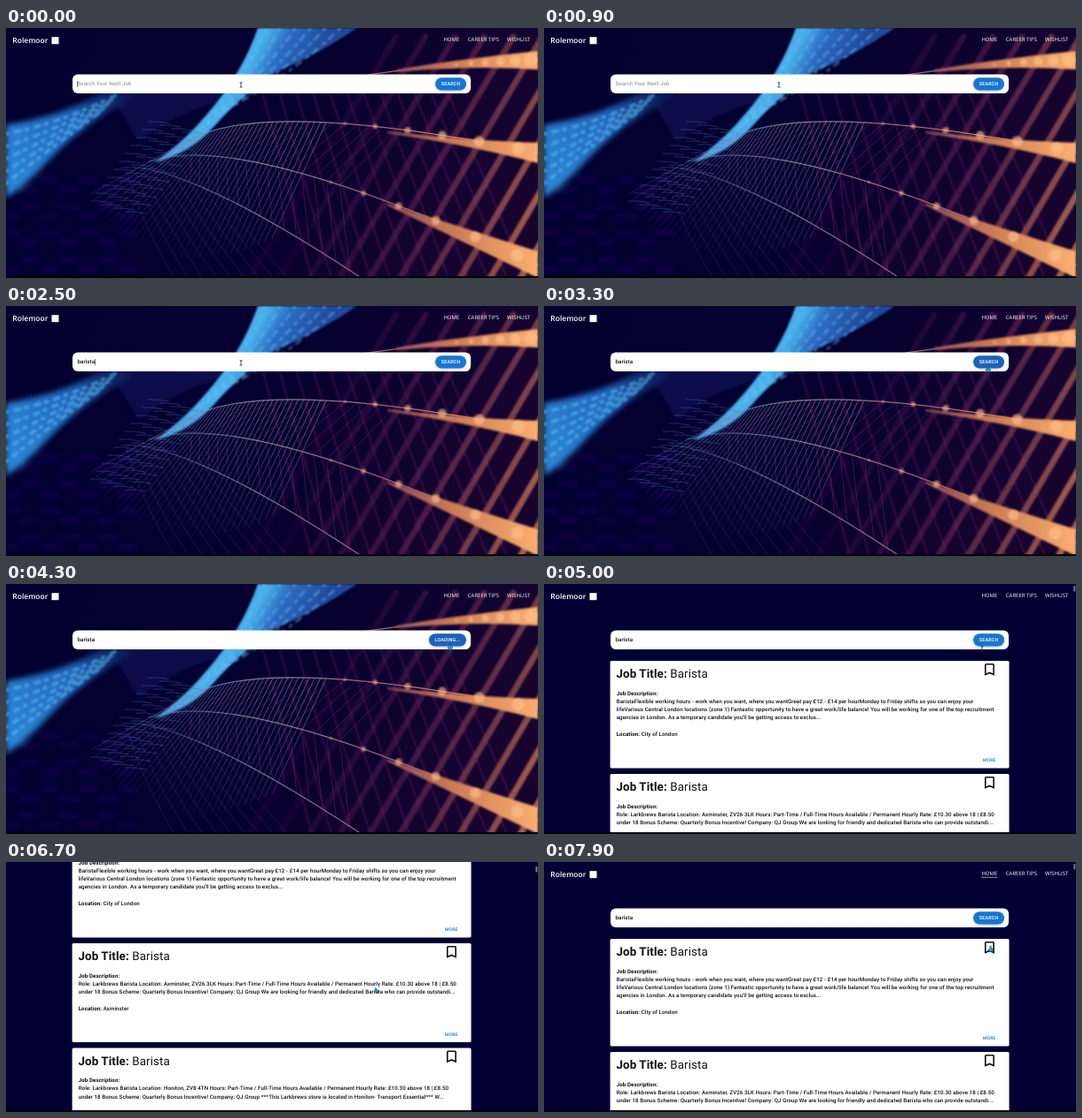
An HTML page for the animation above (8 s loop, 600x283 px).

```html
<!DOCTYPE html>
<html lang="en">
<head>
<meta charset="utf-8">
<title>Job search</title>
<style>
html, body { margin: 0; width: 100%; height: 100%; overflow: hidden; background: #000033; }
svg { display: block; width: 100vw; height: 100vh; }
text { font-family: Roboto, sans-serif; text-rendering: geometricPrecision; white-space: pre; fill: #111; }
.nav text { font: 400 6px "Open Sans", sans-serif; fill: #fff; }
.nav .brand { font-size: 8.5px; font-weight: 600; }
.body { font-size: 6.2px; font-weight: 500; letter-spacing: .0094em; }
.title { font-size: 13.4px; letter-spacing: .0073em; }
.bold { font-weight: 700; }
.btn { font-size: 5.46px; font-weight: 500; letter-spacing: .0286em; fill: #fff; text-anchor: middle; }
.more { font-size: 5.06px; font-weight: 500; letter-spacing: .0286em; fill: #1976d2; }
</style>
</head>
<body>
<svg viewBox="0 0 600 283">
  <defs>
    <linearGradient id="base" x2="1" y2=".2">
      <stop offset="0" stop-color="#02002f"/>
      <stop offset=".6" stop-color="#06002f"/>
      <stop offset="1" stop-color="#16042f"/>
    </linearGradient>
    <linearGradient id="ribbon" gradientUnits="userSpaceOnUse" x1="290" y1="15" x2="345" y2="45">
      <stop offset="0" stop-color="#48aeea"/>
      <stop offset=".35" stop-color="#2c6cc2"/>
      <stop offset="1" stop-color="#204a9c"/>
    </linearGradient>
    <linearGradient id="lobe" gradientUnits="userSpaceOnUse" x1="0" y1="150" x2="165" y2="65">
      <stop offset="0" stop-color="#2c84d4"/>
      <stop offset=".5" stop-color="#2364ba"/>
      <stop offset="1" stop-color="#0c1458" stop-opacity=".2"/>
    </linearGradient>
    <linearGradient id="warm" gradientUnits="userSpaceOnUse" x1="410" y1="0" x2="600" y2="0">
      <stop offset="0" stop-color="#7a3a5c"/>
      <stop offset=".5" stop-color="#cc7c54"/>
      <stop offset="1" stop-color="#fbae70"/>
    </linearGradient>
    <linearGradient id="beam" gradientUnits="userSpaceOnUse" x1="370" y1="120" x2="600" y2="190">
      <stop offset="0" stop-color="#5a1a5e" stop-opacity=".15"/>
      <stop offset=".5" stop-color="#642656" stop-opacity=".6"/>
      <stop offset="1" stop-color="#bc6c50" stop-opacity=".85"/>
    </linearGradient>
    <linearGradient id="mesh" gradientUnits="userSpaceOnUse" x1="300" y1="100" x2="240" y2="275">
      <stop offset="0" stop-color="#8e9cc6" stop-opacity=".7"/>
      <stop offset=".6" stop-color="#6c78b4" stop-opacity=".5"/>
      <stop offset="1" stop-color="#4a3c90" stop-opacity=".15"/>
    </linearGradient>
    <linearGradient id="strand" gradientUnits="userSpaceOnUse" x1="140" y1="0" x2="600" y2="0">
      <stop offset="0" stop-color="#4a72b8" stop-opacity=".3"/>
      <stop offset=".3" stop-color="#9c98b0" stop-opacity=".8"/>
      <stop offset=".6" stop-color="#a0607a"/>
      <stop offset="1" stop-color="#f8a866"/>
    </linearGradient>
    <filter id="soft" x="-10%" y="-10%" width="120%" height="120%"><feGaussianBlur stdDeviation="3"/></filter>
    <filter id="haze" x="-10%" y="-10%" width="120%" height="120%"><feGaussianBlur stdDeviation="1.2"/></filter>
    <filter id="shade" x="-20%" y="-30%" width="140%" height="180%"><feDropShadow dx="0" dy=".7" stdDeviation=".8" flood-opacity=".3"/></filter>
  </defs>
  <rect width="600" height="283" fill="#000033"/>
  <g id="photo"></g>
  <g id="page">
    <g class="nav">
      <text class="brand" x="7.3" y="16.8">Rolemoor</text>
      <rect x="51.5" y="10.2" width="8" height="8" fill="#fff"/>
      <text x="493.4" y="15.4">HOME</text>
      <text x="520.8" y="15.4">CAREER TIPS</text>
      <text x="565" y="15.4">WISHLIST</text>
      <rect id="under" x="493.4" y="16.9" width="18" height=".6" fill="#fff"/>
    </g>
    <rect x="75" y="52.4" width="449.2" height="21.6" rx="6" fill="#fff"/>
    <text id="query" class="body" x="80.5" y="65.2"></text>
    <rect id="caret" y="60" width=".6" height="7" fill="#111"/>
    <rect id="button" y="56.2" height="14.4" rx="7.2" filter="url(#shade)"/>
    <text id="label" class="btn" y="65.4"></text>
    <g id="cards"></g>
  </g>
  <rect id="thumb" x="597.4" width="1.9" height="6.5" rx=".6" fill="#80808c"/>
  <rect y="281" width="600" height="2" fill="#000"/>
  <g id="cursor" fill="#2ba6dc" stroke="#10376a" stroke-width=".6" stroke-linejoin="round">
    <path id="arrow" d="M0 0V5.4L1.3 4.3L2.2 6.2L3.1 5.8L2.3 4H4Z"/>
    <path id="hand" d="M-.7.4Q0-.4.7.4V2.7L2.6 3.2Q3.1 3.5 2.9 4.6L2.2 6.6H-1L-2.5 4.3Q-2 3.4-.7 4.2Z"/>
    <path id="beamer" d="M-1.4-2.6H1.4M0-2.6V2.6M-1.4 2.6H1.4" fill="none" stroke="#123f6e" stroke-width=".9"/>
  </g>
</svg>
<script>
const $ = id => document.getElementById(id);
const LOOP = 8000, STEP = 100;
const RESULTS = 4900, LOADING = 3700;

// ---- backdrop ----
const quad = (a, b, c) => ({
  d: `M${a}Q${b} ${c}`,
  at: t => [0, 1].map(k => (1 - t) ** 2 * a[k] + 2 * t * (1 - t) * b[k] + t * t * c[k])
});
const strands = [
  quad([385, 57], [480, 40], [600, 36]),
  quad([200, 131], [280, 76], [600, 141]),
  quad([160, 152], [260, 112], [600, 268]),
  quad([130, 158], [200, 150], [404, 285])
];
const hem = quad([95, 188], [165, 300], [300, 238]);
const times = (n, f) => Array.from({ length: n }, (_, i) => f(i)).join('');
const line = (a, b) => `M${a}L${b}`;

function drawPhoto() {
  const [top, upper, middle, lower] = strands;
  const fan = times(34, i => line(upper.at(.04 + i * .0155), hem.at(i / 33)));
  const ribs = times(9, i => `M${135 + i * 9} ${158 - i * 4}Q${150 + i * 9} ${215 - i * 5} ${190 + i * 16} 283`);
  const cross = times(15, i => line(upper.at(.3 + i * .03), middle.at(.2 + i * .03)) +
    line(middle.at(.2 + i * .03), lower.at(.4 + i * .04)));
  const weave = times(12, i => line([290 + i * 19, 75], [345 + i * 22, 283]));
  const beams = times(11, i => line([440 + i * 33, 10], [270 + i * 34, 290]));
  const steps = times(44, i => {
    const row = i % 11, col = Math.floor(i / 11);
    return `M${160 - row * 6.5 + col * 13} ${106 + row * 9 + col * 4}q11 -1 24 2`;
  });
  const blocks = times(28, i => `M${(i % 7) * 22 - 6} ${172 + Math.floor(i / 7) * 30 + (i % 2) * 11}h22`);
  const grain = times(5, i => `M0 ${120 + i * 14}Q${62 - i * 3} ${108 + i * 7} ${128 - i * 5} ${74 + i * 5}`);
  const glints = times(6, i => `M${292 + i * 17} 0Q${280 + i * 10} ${38 + i * 2} ${218 + i * 5} ${116 - i * 4}`);
  const spots = [top, upper, middle].map(s => times(6, i => {
    const [x, y] = s.at(.6 + i * .073);
    return `<circle cx="${x}" cy="${y}" r="${1.6 + i * 1.1}"/>`;
  })).join('');
  $('photo').innerHTML = `
    <rect width="600" height="283" fill="url(#base)"/>
    <g fill="none" filter="url(#soft)">
      <path d="${blocks}" stroke="#0c0850" stroke-width="9" opacity=".6"/>
      <path d="M120 80Q190 66 262 56L240 84Q190 96 150 130Z" fill="#0a1058" opacity=".7"/>
      <path d="M0 110Q60 100 100 78T168 60Q140 80 108 100T48 150T0 192Z" fill="url(#lobe)"/>
    </g>
    <g fill="none" stroke-linecap="round" filter="url(#haze)">
      <path d="${grain}" stroke="#58bcf0" stroke-width="4" stroke-dasharray="2 9 5 7" opacity=".55"/>
      <path d="M284 0H396Q352 30 304 50Q262 80 236 110Q208 142 168 152Q202 128 228 96Q266 52 284 0Z" fill="url(#ribbon)"/>
      <path d="${glints}" stroke="#6cc8f4" stroke-width="2.4" stroke-dasharray="3 8 7 6" opacity=".45"/>
      <path d="${weave}" stroke="#4c1654" stroke-width="2.6" opacity=".5"/>
      <path d="${beams}" stroke="url(#beam)" stroke-width="7"/>
    </g>
    <g fill="none">
      <path d="${steps}" stroke="#4a74b4" stroke-width=".8" opacity=".5"/>
      <path d="${ribs}" stroke="#4c5ea8" stroke-width=".6" opacity=".4"/>
      <path d="${fan}" stroke="url(#mesh)" stroke-width=".8"/>
      <path d="${cross}" stroke="#8a3c74" stroke-width=".7" opacity=".55"/>
      <path d="${strands.map(s => s.d).join('')}" stroke="url(#strand)" stroke-width="1.2"/>
    </g>
    <g fill="url(#warm)" filter="url(#haze)">
      <path d="M440 47Q520 34 600 26V47Q520 42 440 50Z"/>
      <path d="M430 117Q520 127 600 130V153Q520 132 430 119Z"/>
      <path d="M430 198Q520 228 600 253V283Q520 244 430 201Z"/>
    </g>
    <g fill="#ffc08a" opacity=".65" filter="url(#haze)">${spots}</g>`;
}

// ---- result cards ----
const jobs = [
  { top: 87, h: 121.5, place: 'City of London', lines: [
    'BaristaFlexible working hours - work when you want, where you wantGreat pay £12 - £14 per hourMonday to Friday shifts so you can enjoy your',
    'lifeVarious Central London locations (zone 1) Fantastic opportunity to have a great work/life balance! You will be working for one of the top recruitment',
    'agencies in London. As a temporary candidate you\'ll be getting access to exclus...'] },
  { top: 215, h: 112, place: 'Axminster', lines: [
    'Role: Larkbrews Barista Location: Axminster, ZV26 3LK Hours: Part-Time / Full-Time Hours Available / Permanent Hourly Rate: £10.30 above 18 | £8.50',
    'under 18 Bonus Scheme: Quarterly Bonus Incentive! Company: QJ Group We are looking for friendly and dedicated Barista who can provide outstandi...'] },
  { top: 333.5, h: 112, place: 'Honiton', lines: [
    'Role: Larkbrews Barista Location: Honiton, ZV8 4TN Hours: Part-Time / Full-Time Hours Available / Permanent Hourly Rate: £10.30 above 18 | £8.50',
    'under 18 Bonus Scheme: Quarterly Bonus Incentive! Company: QJ Group ***This Larkbrews store is located in Honiton- Transport Essential*** W...'] }
];
const text = (cls, x, y, s) => `<text class="${cls}" x="${x}" y="${y}">${s}</text>`;
const card = ({ top, h, place, lines }) => `<g transform="translate(0 ${top})">
  <rect x="74.6" width="450" height="${h}" rx="1.6" fill="#fff"/>
  ${text('title', 81.4, 19.2, '<tspan class="bold">Job Title:</tspan> Barista')}
  <path d="M497.8 15.6V4.6Q497.8 3.8 498.6 3.8H506.4Q507.2 3.8 507.2 4.6V15.6L502.5 13.5Z" fill="none" stroke="#111" stroke-width="1.6"/>
  ${text('body bold', 81.7, 38.6, 'Job Description:')}
  ${lines.map((s, i) => text('body', 81.7, 47.9 + i * 9.25, s)).join('')}
  ${text('body', 81.7, 57.2 + lines.length * 9.25, `<tspan class="bold">Location:</tspan> ${place}`)}
  ${text('more', 495, h - 7.4, 'MORE')}
</g>`;

// ---- timeline ----
const path = [[0, 265, 64.4], [2500, 265, 64.4], [3200, 500.5, 67.8], [4900, 500.5, 67.8], [5500, 413.6, 142],
  [5800, 413.6, 142], [6600, 416.6, 142.4], [6900, 416.6, 142.4], [7500, 503, 14], [7600, 503, 14], [7900, 503.6, 95]];
const scrolls = [[0, 0], [5400, 0], [5700, 50], [5900, 50], [6600, 123], [6900, 123], [7500, 0]];
const WORD = 'barista';

function track(keys, t) {
  const i = keys.findIndex(k => k[0] > t);
  if (i < 0) return keys[keys.length - 1].slice(1);
  const a = keys[i - 1], b = keys[i];
  let u = (t - a[0]) / (b[0] - a[0]);
  u = u * u * (3 - 2 * u);
  return a.slice(1).map((v, k) => v + (b[k + 1] - v) * u);
}
const show = (id, on) => $(id).setAttribute('display', on ? 'inline' : 'none');
const set = (id, attrs) => { for (const k in attrs) $(id).setAttribute(k, attrs[k]); };
const inside = (x, y, l, t, r, b) => x >= l && x <= r && y >= t && y <= b;

function render(t) {
  const done = t >= RESULTS, loading = t >= LOADING && !done;
  const [scroll] = track(scrolls, t);
  const [x, y] = track(path, t);
  const py = y + scroll;

  show('photo', !done);
  show('cards', done);
  show('thumb', done);
  set('page', { transform: `translate(0 ${-scroll})` });
  set('thumb', { y: 2 + scroll * .025 });
  show('under', t >= 7400);

  const n = Math.max(0, Math.min(WORD.length, Math.floor((t - 900) / 200)));
  const query = $('query');
  query.textContent = n ? WORD.slice(0, n) : 'Search Your Next Job';
  query.style.fill = n ? '#111' : '#a0a0a0';
  const blink = t < 1000 ? t < 500 : t < 2300 || Math.floor((t - 2300) / 530) % 2 === 0;
  show('caret', blink && t < 3600);
  set('caret', { x: n ? 80.8 + query.getComputedTextLength() : 80.2 });

  const left = loading ? 477 : 484.2;
  const over = inside(x, py, left, 56, 519, 70.6);
  set('button', { x: left, width: 519 - left, fill: over ? '#1e64b8' : '#1976d2' });
  set('label', { x: (left + 519) / 2 });
  $('label').textContent = loading ? 'LOADING...' : 'SEARCH';

  const onInput = !over && inside(x, py, 75, 52, 524, 74);
  const onLink = over || inside(x, py, 493, 9, 512, 19) ||
    done && jobs.some(j => inside(x, py, 496, j.top + 3, 509, j.top + 17));
  show('beamer', onInput);
  show('hand', onLink);
  show('arrow', !onInput && !onLink);
  set('cursor', { transform: `translate(${x} ${y})` });
}

drawPhoto();
$('cards').innerHTML = jobs.map(card).join('');
const start = performance.now();
function tick() {
  const t = (performance.now() - start) % LOOP;
  render(Math.floor(t / STEP) * STEP);
  requestAnimationFrame(tick);
}
tick();
</script>
</body>
</html>
```
